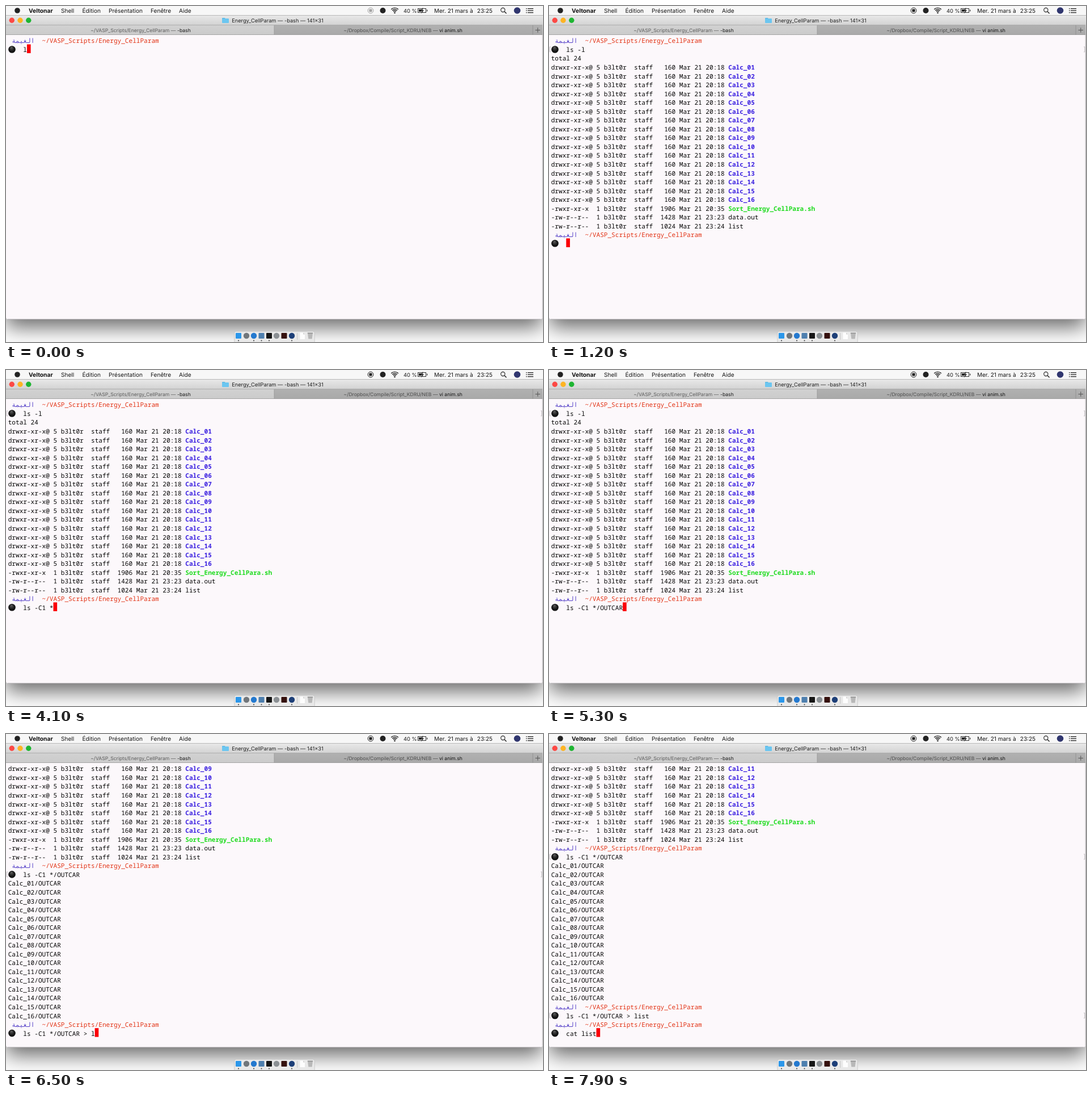
These frames come from a looping animation (947 by 592 pixels, 8 s). An HTML page with a canvas:

```html
<!DOCTYPE html>
<html lang="fr">
<head>
<meta charset="utf-8">
<title>Session bash</title>
<style>
html, body { margin: 0; width: 947px; height: 592px; overflow: hidden; background: #fff; }
canvas { display: block; }
</style>
</head>
<body>
<canvas id="stage" width="947" height="592"></canvas>
<script>
const ctx = document.getElementById('stage').getContext('2d');
const LOOP = 8000, ROWS = 31, COL = 6.65, PITCH = 15.54, LEFT = 3.7, BASE = 65.4;
const MONO = '11.08px "Noto Sans Mono", "DejaVu Sans Mono", monospace';
const ARABIC = '11.08px "DejaVu Sans Mono", "Noto Sans Mono", monospace';
const UI = 'px Inter, "Open Sans", sans-serif';
const BLACK = '#050505', BLUE = '#3a1fe0', GREEN = '#1edb1e', RED = '#e23214', VIOLET = '#5540c8';

// Keystrokes: start time, then one key every 100 ms (\b erases, ↑ recalls, \n runs)
const KEYS = [
  [0, 'ls '], [500, '-'], [1100, 'l\n'],
  [1700, 'ls -'], [2300, 'Cl '], [3000, '\b\b'], [3300, '1'], [3500, ' '],
  [4100, '*'], [4400, '/'], [4600, 'O'], [4800, 'U'], [5000, 'TCAR\n'],
  [5700, '↑'], [5900, ' '], [6300, '> list\n'], [7200, 'cat list']
];

const dirs = Array.from({ length: 16 }, (_, i) => 'Calc_' + String(i + 1).padStart(2, '0'));
const entry = (mode, links, size, time, name, color = BLACK) => ({
  text: `${mode} ${links} b3lt0r  staff  ${String(size).padStart(4)} Mar 21 ${time} `, name, color
});
const OUTPUTS = [
  [
    { text: 'total 24' },
    ...dirs.map(d => entry('drwxr-xr-x@', 5, 160, '20:18', d, BLUE)),
    entry('-rwxr-xr-x ', 1, 1906, '20:35', 'Sort_Energy_CellPara.sh', GREEN),
    entry('-rw-r--r-- ', 1, 1428, '23:23', 'data.out'),
    entry('-rw-r--r-- ', 1, 1024, '23:24', 'list')
  ],
  dirs.map(d => ({ text: d + '/OUTCAR' })),
  []
];

function screenAt(t) {
  const lines = [];
  let input = '', last = '', runs = 0;
  const prompt = () => lines.push({ path: true }, { command: '' });
  prompt();
  for (const [start, keys] of KEYS) {
    [...keys].forEach((key, i) => {
      if (t < start + i * 100) return;
      if (key === '\n') {
        Object.assign(lines.at(-1), { command: input, done: true });
        lines.push(...OUTPUTS[runs++]);
        last = input;
        input = '';
        prompt();
      } else if (key === '\b') input = input.slice(0, -1);
      else input += key === '↑' ? last : key;
    });
  }
  lines.at(-1).command = input;
  return lines.slice(-ROWS);
}

function rect(x, y, w, h, color) {
  ctx.fillStyle = color;
  ctx.fillRect(x, y, w, h);
}

function disc(x, y, r, color) {
  ctx.fillStyle = color;
  ctx.beginPath();
  ctx.arc(x, y, r, 0, 7);
  ctx.fill();
}

function ring(x, y, r, color, width = 1, from = 0, to = 7) {
  ctx.strokeStyle = color;
  ctx.lineWidth = width;
  ctx.beginPath();
  ctx.arc(x, y, r, from, to);
  ctx.stroke();
}

function path(points, color, width) {
  ctx.beginPath();
  points.forEach(([x, y]) => ctx.lineTo(x, y));
  if (width) {
    ctx.strokeStyle = color;
    ctx.lineWidth = width;
    ctx.stroke();
  } else {
    ctx.fillStyle = color;
    ctx.fill();
  }
}

function round(x, y, w, h, r, color) {
  ctx.fillStyle = color;
  ctx.beginPath();
  ctx.roundRect(x, y, w, h, r);
  ctx.fill();
}

function label(text, x, y, size, color = '#161616', align = 'left', weight = 400) {
  ctx.font = `${weight} ${size}${UI}`;
  ctx.textAlign = align;
  ctx.fillStyle = color;
  ctx.fillText(text, x, y);
}

function mono(text, col, y, color = BLACK, bold = false) {
  ctx.font = (bold ? 'bold ' : '') + MONO;
  ctx.textAlign = 'left';
  ctx.fillStyle = color;
  [...text].forEach((ch, i) => ch !== ' ' && ctx.fillText(ch, LEFT + (col + i) * COL, y));
}

function vertical(y0, y1, top, bottom) {
  const g = ctx.createLinearGradient(0, y0, 0, y1);
  g.addColorStop(0, top);
  g.addColorStop(1, bottom);
  return g;
}

function menuBar(t) {
  rect(0, 0, 947, 16, '#f7f7f7');
  disc(20, 8, 4.8, '#222');
  label('Veltonar', 40, 11.7, 10.3, '#111', 'left', 700);
  [['Shell', 97], ['Édition', 134.5], ['Présentation', 181], ['Fenêtre', 255], ['Aide', 305]]
    .forEach(([text, x]) => label(text, x, 11.7, 10.1));

  const rec = t < 100 ? '#a3a3a3' : '#222';
  ring(643, 8, 4.9, rec);
  round(640.4, 5.4, 5.2, 5.2, 0.8, rec);
  disc(664.5, 8, 5, '#222');

  for (const r of [3.6, 6.4, 9.2]) ring(685.5, 12.6, r, '#222', 1.4, -2.32, -0.82);
  disc(685.5, 12, 1.3, '#222');

  label('40 %', 701, 11.5, 9.3);
  ctx.strokeStyle = '#333';
  ctx.lineWidth = 1;
  ctx.strokeRect(726.5, 4.5, 14, 7);
  rect(742, 6.5, 1.3, 3, '#333');
  rect(728, 6, 4.5, 4, '#222');
  path([[735.5, 2.5], [731, 8.6], [733.6, 8.6], [732.2, 13.5], [737, 7.2], [734.3, 7.2]], '#222');

  label('Mer. 21 mars à', 755, 11.7, 10);
  label('23:25', 858, 11.7, 10, '#161616', 'right');

  ring(876.3, 7, 3.6, '#222', 1.1);
  path([[879, 9.7], [882.5, 13.2]], '#222', 1.4);
  disc(901.5, 8, 5.8, '#30366f');
  for (const y of [4, 7.5, 11]) {
    rect(917, y, 1.6, 1.3, '#222');
    rect(920, y, 10, 1.3, '#222');
  }
}

function windowFrame() {
  ctx.save();
  ctx.shadowColor = 'rgba(0,0,0,.6)';
  ctx.shadowBlur = 36;
  ctx.shadowOffsetY = 14;
  round(0, 17, 946, 535, 4, '#fcf8fb');
  ctx.restore();
  rect(945.6, 51, 0.8, 498, '#c9c6c8');
  rect(3, 551.5, 940, 0.8, '#aaa7a9');

  rect(0, 16, 947, 1, '#b9b9b9');
  rect(0, 17, 946, 17, vertical(17, 34, '#e8e8e8', '#d2d2d2'));
  [['#fc4945', 10.3], ['#fdb424', 25], ['#1eb532', 39.8]].forEach(([c, x]) => disc(x, 25.2, 4.7, c));
  round(381, 21, 5.5, 4, 1, '#4fb2e2');
  round(381, 22, 12, 8, 1, '#6cc6f0');
  label('Energy_CellParam — -bash — 141×31', 479, 28.9, 9.25, '#222', 'center');

  rect(0, 33.5, 473, 17.5, vertical(34, 51, '#d1d1d1', '#cbcbcb'));
  rect(473, 33.5, 473, 17.5, vertical(34, 51, '#b0b0b0', '#a9a9a9'));
  rect(0, 33.3, 946, 0.8, '#a6a6a6');
  rect(0, 50.2, 946, 0.8, '#9c9c9c');
  rect(472.6, 34, 0.8, 17, '#969696');
  rect(928.6, 34, 0.8, 17, '#8c8c8c');
  path([[933.5, 42.5], [942, 42.5]], '#555', 1);
  path([[937.75, 38.2], [937.75, 46.8]], '#555', 1);
  label('~/VASP_Scripts/Energy_CellParam —', 299.3, 45.7, 8.6, '#5c5c5c', 'right');
  label('-bash', 302, 45.7, 8.6, '#151515');
  label('~/Dropbox/Compile/Script_KDRU/NEB —', 761.5, 45.7, 8.6, '#4c4c4c', 'right');
  label('vi anim.sh', 764, 45.7, 8.6, '#111');
}

function dock() {
  round(402.5, 573, 142, 22, 3, '#c3c3c3');
  round(403.3, 573.8, 140.4, 22, 2.5, '#e9e9e9');
  const square = (x, c) => round(x - 5, 576, 10, 10, 1, c);
  const circle = (x, c) => disc(x, 581, 5.2, c);
  square(410, '#2b97ea');
  circle(424, '#71777c');
  circle(437, '#2479cf');
  square(450.5, '#4e7fae');
  square(464, '#161616');
  circle(477, '#8b9094');
  square(490.5, '#35100d');
  circle(504, '#1d3f78');
  rect(513.3, 576, 0.8, 12, '#bdbdbd');
  path([[518.5, 575.5], [524, 575.5], [527, 578.5], [527, 587], [518.5, 587]], '#fdfdfd');
  path([[524, 575.5], [524, 578.5], [527, 578.5]], '#d0d0d0');
  path([[532, 576.5], [541, 576.5], [539.7, 586.5], [533.3, 586.5]], '#b8b8b8');
  rect(531.8, 575.6, 9.4, 1.5, '#8f8f8f');
  for (const x of [410, 437, 450.5, 464, 504]) disc(x, 589.4, 1, '#333');
}

function ball(x, y) {
  const g = ctx.createRadialGradient(x - 1, y - 3.5, 0.5, x, y, 6.4);
  g.addColorStop(0, '#5c5c5c');
  g.addColorStop(0.6, '#1c1c1c');
  g.addColorStop(1, '#0a0a0a');
  disc(x, y, 6.3, g);
}

function session(t) {
  const lines = screenAt(t);
  lines.forEach((line, i) => {
    const y = BASE + i * PITCH;
    if (line.path) {
      ctx.font = ARABIC;
      ctx.textAlign = 'left';
      ctx.fillStyle = VIOLET;
      ctx.fillText('الغيمة', LEFT + COL, y);
      mono('~/VASP_Scripts/Energy_CellParam', 9, y, RED);
    } else if (line.command !== undefined) {
      if (line.done) {
        const mark = (a, b) => path([[a, y - 9], [b, y - 9], [b, y], [a, y]], '#bab6b9', 0.9);
        mark(3, 1.5);
        mark(943, 944.7);
      }
      ball(10.5, y - 4.5);
      mono(line.command, 4, y);
    } else {
      mono(line.text, 0, y);
      if (line.name) mono(line.name, line.text.length, y, line.color, line.color !== BLACK);
    }
  });
  const y = BASE + (lines.length - 1) * PITCH;
  rect(LEFT + (4 + lines.at(-1).command.length) * COL, y - 13.4, COL, PITCH, '#fb0007');
}

function draw() {
  const t = performance.now() % LOOP;
  ctx.textRendering = 'geometricPrecision';
  rect(0, 0, 947, 592, '#fff');
  windowFrame();
  menuBar(t);
  dock();
  session(t);
  requestAnimationFrame(draw);
}
draw();
</script>
</body>
</html>
```
